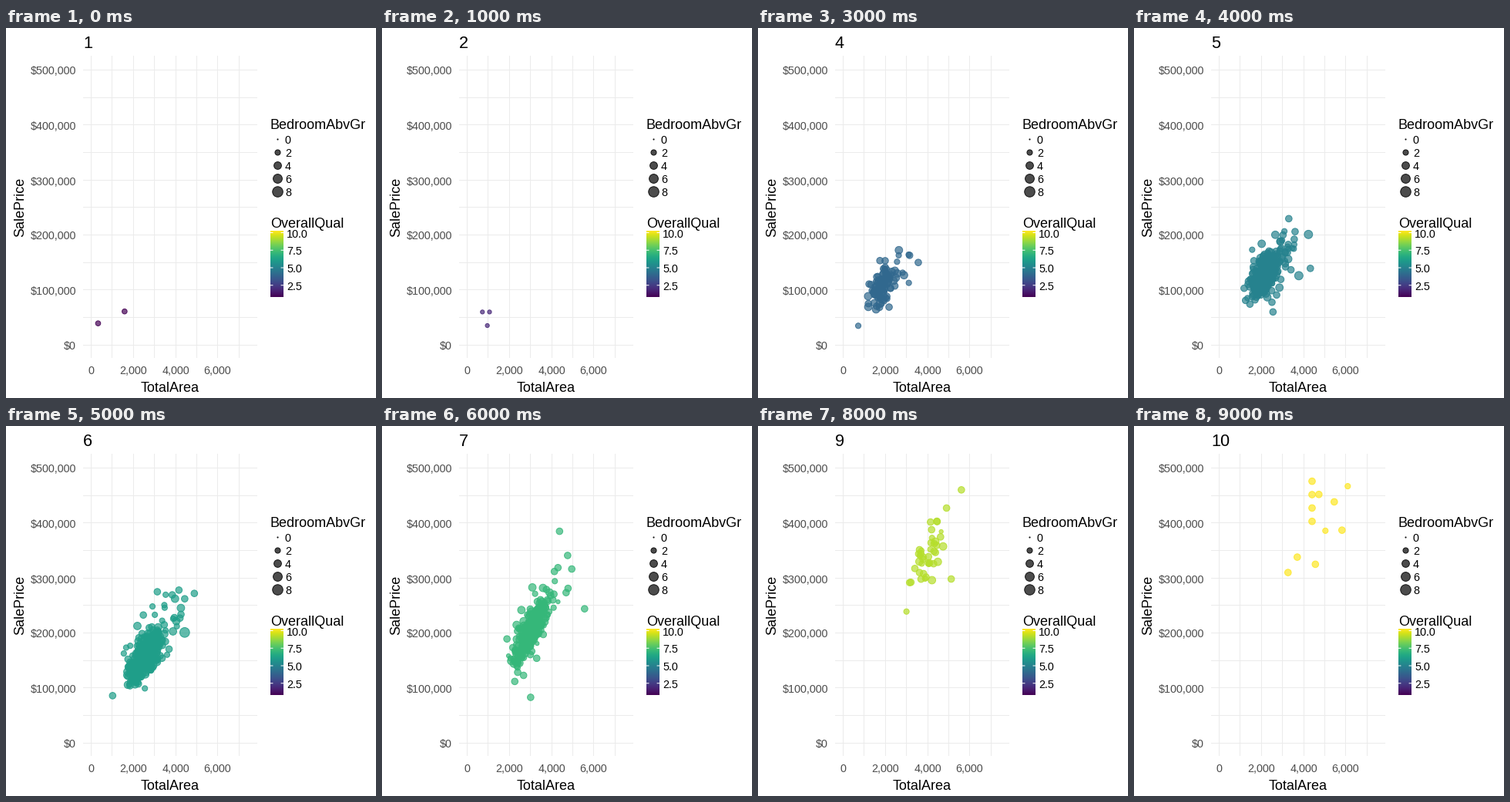
Recreate the animation shown at these times as a matplotlib script. Size 480 by 480 pixels, loop 10 s.

```python
import numpy as np
import matplotlib.pyplot as plt
from matplotlib.animation import FuncAnimation

SIZE, DPI = 480, 72          # at 72 dpi one point is one pixel
LEFT, RIGHT, TOP, BOTTOM = 100, 326, 36, 428
ALPHA, EDGE_ALPHA = 0.7, 0.85
GRID, TICK_TEXT = "#EBEBEB", "#4D4D4D"

plt.rcParams["font.family"] = "Liberation Sans"
viridis = plt.get_cmap("viridis")
rng = np.random.default_rng(12)


def to_x(area):
    return 110.3 + area * 0.02743


def to_y(thousands):
    return 411.2 - thousands * 0.71333


def marker_size(beds):
    """Marker area for a bedroom count (area scale, 8 is the largest)."""
    radius = 0.375 * (17.07 * np.sqrt(np.asarray(beds) / 8) + 0.945)
    return (2 * np.maximum(radius, 0.6)) ** 2


def cloud(n, area, price, sd_area, sd_price, rho):
    """Dense core of homes with a wider halo leaning to large, dear ones."""
    z = rng.normal(size=(2 * n, 2))
    z = z[np.hypot(*z.T) < 2.2][:n]
    z[:, 1] = rho * z[:, 0] + np.sqrt(1 - rho ** 2) * z[:, 1]
    halo = np.arange(len(z)) % 5 == 0
    z[halo] = 0.9 + 1.8 * z[halo]
    beds = rng.choice([1, 2, 3, 4], len(z), p=[0.03, 0.27, 0.52, 0.18])
    return np.column_stack([area + sd_area * z[:, 0],
                            price + sd_price * z[:, 1], beds])


def homes(beds, *places):
    """Single homes (area, price in thousands) with one bedroom count."""
    return np.array([(*p, beds) for p in places], float)


# One table of homes per quality level, 1 to 10
levels = [
    homes(1.7, (334, 39.3), (1587, 61)),
    homes(1, (960, 35.3), (1064, 60), (728, 60)),
    np.vstack([cloud(16, 1850, 82, 420, 15, 0.3),
               homes(4, (1713, 140.7)),
               homes(3, (2424, 126), (2752, 95.2)),
               homes(2, (1568, 37.9))]),
    np.vstack([cloud(114, 1800, 104, 360, 18, 0.5),
               homes(2, (720, 34.9)),
               homes(3, (3560, 150))]),
    np.vstack([cloud(390, 2120, 127, 330, 20, 0.45),
               homes(5, (4229, 201), (3774, 126)),
               homes(3, (3300, 229.7), (4320, 139.3), (2552, 60.1))]),
    np.vstack([cloud(370, 2560, 157, 420, 25, 0.65),
               homes(7, (4430, 201)),
               homes(3, (3136, 275), (4156, 278), (4886, 272), (1021, 86))]),
    np.vstack([cloud(315, 2950, 200, 420, 30, 0.75),
               homes(3, (4375, 385), (4758, 341), (5560, 244), (3008, 83))]),
    np.vstack([cloud(163, 3600, 266, 460, 37, 0.65),
               homes(4, (5943, 411), (6782, 431), (2899, 122.5)),
               homes(2, (2844, 393), (4047, 148))]),
    np.vstack([cloud(42, 4000, 340, 470, 33, 0.5),
               homes(2, (3000, 239))]),
    np.vstack([homes(3, *zip([4400] * 4, np.linspace(403, 476, 4))),
               homes(3, (3263, 310), (3700, 338), (4557, 325),
                     (4721, 452), (5450, 438.5), (5815, 387)),
               homes(2, (5031, 386), (6088, 467))]),
]


fig = plt.figure(figsize=(SIZE / DPI, SIZE / DPI), dpi=DPI, facecolor="white")
ax = fig.add_axes([0, 0, 1, 1])


def label(x, y, text, size=18, color="black", **kw):
    return ax.text(x, y, text, fontsize=size, color=color, **kw)


def line(xs, ys, color, width=1):
    ax.plot(xs, ys, color=color, lw=width, zorder=0 if color == GRID else 3,
            solid_capstyle="butt", snap=False)


def paint(dots, rgb):
    dots.set_facecolor((*rgb, ALPHA))
    dots.set_edgecolor((*rgb, EDGE_ALPHA))


# Panel grid, on whole pixels, and axis labels
for area in range(0, 8000, 1000):
    x = np.floor(to_x(area)) + 0.5
    line([x, x], [TOP, BOTTOM], GRID)
    if area % 2000 == 0:
        label(x, 449, f"{area:,}", 14.4, TICK_TEXT, ha="center")
for price in range(0, 501, 50):
    y = np.floor(to_y(price)) + 0.5
    line([LEFT, RIGHT], [y, y], GRID)
    if price % 100 == 0:
        label(91, y + 6, f"${price * 1000:,}", 14.4, TICK_TEXT, ha="right")
label(213, 472, "TotalArea", ha="center")
label(23, 232.5, "SalePrice", rotation=90, rotation_mode="anchor",
      ha="center", va="baseline")

# Size legend
label(343, 131, "BedroomAbvGr")
for row, beds in enumerate(range(0, 9, 2)):
    y = 143.7 + 17.1 * row
    paint(ax.scatter(352, y, s=marker_size(beds), lw=1), (0, 0, 0))
    label(362, y + 6.3, str(beds), 14.4)

# Colour bar
label(343, 259, "OverallQual")
ax.imshow(np.linspace(1, 0, 256)[:, None], cmap=viridis, aspect="auto",
          extent=[343, 360, 349, 263], interpolation="bilinear")
for value in (2.5, 5, 7.5, 10):
    y = 265.5 + (10 - value) * 9.1
    for x in (343, 356.6):
        line([x, x + 3.4], [y, y], "white")
    label(364, y + 6, f"{value:.1f}", 14.4)

title = label(100, 25.5, "1", 21.6)
dots = ax.scatter([], [], lw=1, zorder=2)

ax.set_xlim(0, SIZE)
ax.set_ylim(SIZE, 0)
ax.axis("off")


def draw(i):
    area, price, beds = levels[i].T
    dots.set_offsets(np.column_stack([to_x(area), to_y(price)]))
    dots.set_sizes(marker_size(beds))
    paint(dots, viridis(i / 9)[:3])
    title.set_text(str(i + 1))
    return dots, title


anim = FuncAnimation(fig, draw, frames=len(levels), interval=1000,
                     repeat=True, repeat_delay=0)
plt.show()
```
